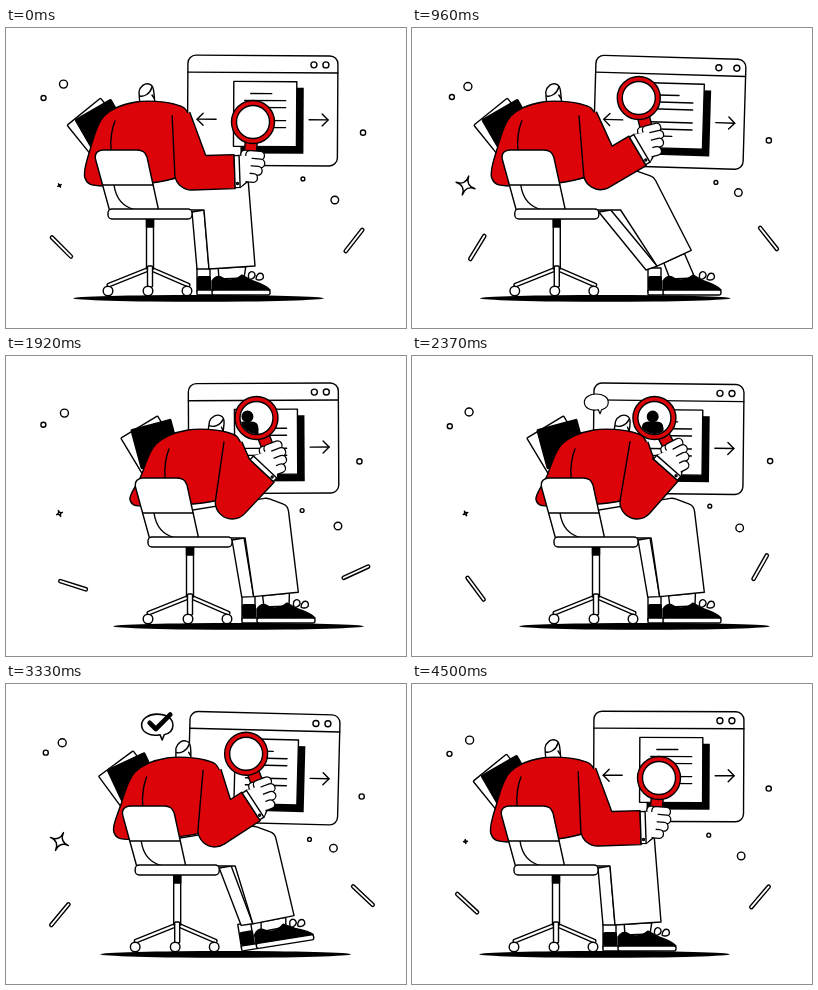
Write an HTML page with a canvas that moves like this. It is 400x300 px and loops after 4.53 s.

```html
<!DOCTYPE html>
<html lang="en">
<head>
<meta charset="utf-8">
<title>Searching</title>
<style>
html, body { margin: 0; width: 100%; height: 100%; overflow: hidden; background: #fff; }
canvas { display: block; width: 400px; height: 300px; }
</style>
</head>
<body>
<canvas id="stage"></canvas>
<script>
const LOOP = 4530, RED = '#dd0409', INK = '#000', PAPER = '#fff';
const canvas = document.getElementById('stage');
const c = canvas.getContext('2d');
const dpr = window.devicePixelRatio || 1;
canvas.width = 400 * dpr;
canvas.height = 300 * dpr;

// Lens path: time, x, y (measured from the chair), handle angle
const LENS = [
  [0, 247, 94, 95], [960, 226, 70, 76], [1500, 246, 97, 99], [1920, 210.5, 62, 69],
  [2850, 199, 62, 60], [3690, 228, 79, 80], [4350, 247, 94, 95], [LOOP, 247, 94, 95]
];
const TORSO = [[98,158], [79,150], [84,122], [98,88], [130,74], [168,76], [183,88], [188,130], [166,151]];
const SHOULDER = [175, 86];
const SPINE_PIVOT = [185, 172], SEAT_PIVOT = [150, 182];
const UPPER_ARM = 60, FOREARM = 43, ARM_R = 17;

// x, y, dot radius, orbit radius, start angle, direction
const DOTS = [
  [57, 57.5, 4, 1.5, -70, -1], [38.6, 69.2, 2.5, 1.3, 145, -1],
  [356, 108.5, 2.6, 4, -75, 1], [328.5, 168, 3.8, 4, 85, 1], [300, 153.5, 1.9, 4, -140, 1]
];

const rad = d => d * Math.PI / 180;
const mix = (a, b, u) => a + (b - a) * u;
const mixPt = (a, b, u) => [mix(a[0], b[0], u), mix(a[1], b[1], u)];
const polar = ([x, y], r, a) => [x + r * Math.cos(a), y + r * Math.sin(a)];
const clamp = v => Math.min(1, Math.max(0, v));

function ramp(t, from, to) {
  const p = clamp((t - from) / (to - from));
  return p < .5 ? 4 * p ** 3 : 1 - 4 * (1 - p) ** 3;
}
const pulse = (t, a, b, d, e) => ramp(t, a, b) * (1 - ramp(t, d, e));

function spin([x, y], [px, py], deg) {
  const a = rad(deg), dx = x - px, dy = y - py;
  return [px + dx * Math.cos(a) - dy * Math.sin(a), py + dx * Math.sin(a) + dy * Math.cos(a)];
}

// Smooth interpolation without overshoot.
function track(rows, t) {
  let i = 0;
  while (i < rows.length - 2 && t >= rows[i + 1][0]) i++;
  const h = rows[i + 1][0] - rows[i][0], p = (t - rows[i][0]) / h;
  return rows[i].map((v, k) => {
    const slope = j => (rows[j + 1][k] - rows[j][k]) / (rows[j + 1][0] - rows[j][0]);
    const tangent = j => {
      if (j === 0 || j === rows.length - 1) return 0;
      const a = slope(j - 1), b = slope(j);
      return a * b <= 0 ? 0 : 2 * a * b / (a + b);
    };
    return mix(v, rows[i + 1][k], p * p * (3 - 2 * p)) +
      h * (tangent(i) * p * (1 - p) ** 2 - tangent(i + 1) * p * p * (1 - p));
  }).slice(1);
}

function paint(fill, width = 1.4) {
  if (fill) { c.fillStyle = fill; c.fill(); }
  if (width) { c.lineWidth = width; c.stroke(); }
}
function poly(pts, fill, width, closed = true) {
  c.beginPath();
  pts.forEach(p => c.lineTo(...p));
  if (closed) c.closePath();
  paint(fill, width);
}
const line = (pts, width) => poly(pts, null, width, false);
function tube(pts, width) {
  line(pts, width);
  c.strokeStyle = PAPER;
  line(pts, width - 2.6);
  c.strokeStyle = INK;
}
function disc(x, y, r, fill = PAPER, width) {
  c.beginPath();
  c.arc(x, y, r, 0, 7);
  paint(fill, width);
}
function box(x, y, w, h, r, fill = PAPER, width) {
  c.beginPath();
  c.roundRect(x, y, w, h, r);
  paint(fill, width);
}
function svg(d, fill, width = 1.4) {
  const p = new Path2D(d);
  if (fill) { c.fillStyle = fill; c.fill(p); }
  if (width) { c.lineWidth = width; c.stroke(p); }
}
function blob(pts, fill) {
  const n = pts.length, at = i => pts[(i + n) % n];
  c.beginPath();
  c.moveTo(...pts[0]);
  for (let i = 0; i < n; i++) {
    const [a, b, d, e] = [at(i - 1), at(i), at(i + 1), at(i + 2)];
    c.bezierCurveTo(b[0] + (d[0] - a[0]) / 6, b[1] + (d[1] - a[1]) / 6,
      d[0] - (e[0] - b[0]) / 6, d[1] - (e[1] - b[1]) / 6, d[0], d[1]);
  }
  paint(fill);
}
function group(x, y, angle, draw, scale = 1) {
  c.save();
  c.translate(x, y);
  c.rotate(rad(angle));
  c.scale(scale, scale);
  draw();
  c.restore();
}
const around = ([x, y], angle, draw) =>
  group(x, y, angle, () => { c.translate(-x, -y); draw(); });

function windowPlace(p, draw) {
  const [x, y] = polar([257.3, 83.3], 1, rad(-130 - 360 * p));
  group(x, y, .8 + 1.1 * Math.cos(2 * Math.PI * (p - .32)), draw);
}

function browser(t) {
  const spread = 3 * pulse(t, 500, 900, 1500, 1900);
  box(-75, -55, 150, 110, 8);
  line([[-75, -38], [75, -38]]);
  disc(51 - spread, -46, 3);
  disc(63 + spread, -46, 3);
  [-1, 1].forEach(s => {
    line([[s * 46.5, 9], [s * 65.5, 9]]);
    line([[s * 59.5, 3], [s * 65.5, 9], [s * 59.5, 15]]);
  });
  box(-22, -23, 63, 66, 0, INK, 0);
  box(-29, -29, 63, 65, 0);
  for (let i = 0; i < 6; i++) {
    const x = -12 - Math.min(i, 1) * 6, y = -17 + i * 7 + (i > 2 ? 6 : 0);
    line([[x, y], [x + (i % 5 ? 41 : 21), y]]);
  }
}

function scatter(t, p) {
  DOTS.forEach(([x, y, r, orbit, start, dir]) =>
    disc(...polar([x, y], orbit, rad(start + dir * 360 * p)), r));
  const turn = 360 * t / LOOP;
  const stick = () => box(-15, -1.6, 30, 3.2, 1.5);
  group(...polar([60, 225.5], 8, rad(turn - 125)), 45 + turn, stick);
  group(...polar([352.5, 212.5], 4.5, rad(180 + 360 * p)), 128 - turn, stick);

  const r = 2 + 8 * Math.sin(Math.PI * p ** .8) ** 2;
  group(53.5, 157.5, (p - .26) * 115, () => {
    c.beginPath();
    c.moveTo(r, 0);
    for (let i = 1; i < 5; i++) c.quadraticCurveTo(0, 0, ...polar([0, 0], r, rad(90 * i)));
    paint(PAPER);
  });
}

function bubble(t, x, y) {
  const size = pulse(t, 2200, 2480, 3520, 3900);
  if (size < .01) return;
  group(x - 21, y - 21, 0, () => {
    svg('M0 1L-2-4C-11-2-19-6-19-13C-19-19-12-23-5-23C4-23 10-19 10-13C10-8 6-5 2-4Z', PAPER);
    const mark = pulse(t, 2430, 2680, 3250, 3600);
    if (mark > .01) group(-3, -14, 0, () => line([[-9, -1], [-3, 5], [11, -9]], 4.6), mark);
  }, size * 1.08);
}

function head(x, y, angle) {
  group(x, y, angle, () => {
    svg('M-7 4L-8-11C-7-17-2-20 2-19C7-18 7-12 8 4Z', PAPER);
    svg('M-7-7C-3-6 3-9 5-16M5-8L7-5');
  });
}

function files(lean, rock) {
  const x = 91 + 13 * lean - 9 * rock, y = 100 - 11 * lean + 8 * rock;
  const angle = -39 + 8 * lean + 54 * rock;
  group(x, y, angle, () => box(-21.5, -21, 43, 42, 1));
  group(x + 6, y - 1, angle + 9 + 7 * lean - 9 * rock, () => box(-20.5, -20, 41, 40, 1, INK));
}

function farShoe() {
  box(0, -27, 13, 24, 0);
  box(0, -19, 14, 14, 2, INK, 0);
  box(0, -5, 16, 5, 1);
}
function nearShoe() {
  svg('M15-5L15-14Q19-20 24-18Q34-11 45-20L56-14Q70-9 73-5Z', INK);
  box(15, -5, 58, 5, 2);
  [[52, 15], [59, 40]].forEach(([x, a]) =>
    group(x, -16, a, () => svg('M0 0C-5-7 3-11 5-5C5-2 2 0 0 0Z', PAPER)));
}

function legs(t, hip, foot) {
  const u = (foot - hip) / 45;
  const heel = [191 + foot, 267];
  const tilt = -22 * pulse(t, 3050, 3650, 3750, 4200) - 9 * Math.sin(Math.PI * ramp(t, 220, 820));
  const hemFront = [249 + 30 * u, 238 - 16 * u], hemBack = [203 + 42 * u, 241 - 3 * u];
  const shift = ([x, y]) => [x + hip, y];

  group(...heel, tilt, farShoe);
  poly([[186, 184], [198, 182], hemBack, [191 + 43 * u, 241 + u]].map(shift), PAPER);
  const sock = [[47, -17], [22, -16]].map(([x, y]) => spin([heel[0] + x, heel[1] + y], heel, tilt));
  poly([...[.2, .8].map(k => shift(mixPt(hemBack, hemFront, k))), ...sock], PAPER);
  group(...heel, tilt, nearShoe);

  group(hip, 0, 0, () => {
    const knee = [242 - u, 150 - u];
    c.beginPath();
    c.moveTo(110, 160);
    c.arcTo(221, 142, ...knee, 10);
    c.arcTo(...knee, ...hemFront, 9);
    [hemFront, hemBack, [198 + 10 * u, 182], [110, 182]].forEach(q => c.lineTo(...q));
    c.closePath();
    paint(PAPER);
  });
}

function chair(tilt) {
  around(SEAT_PIVOT, tilt, () => {
    svg('M104 184L90 133Q87 123 97 122L131 122Q139 122 141 129L153 184Z', PAPER);
    svg('M97 157L147 157M108 157Q111 178 130 182');
  });
  tube([[143, 241], [103, 257]], 5);
  tube([[145, 241], [182, 257]], 5);
  box(140.5, 191, 7, 50, 0);
  box(140.5, 191, 7, 8, 0, INK);
  box(141.5, 238, 5, 21, 1);
  [102, 142, 181].forEach(x => disc(x, 263, 4.8));
  box(102, 181, 84, 10, 4);
}

function torso(lean) {
  const pts = TORSO.map(([x, y]) => {
    const k = clamp((165 - y) / 50);
    return [x + lean * (2 + 10 * k), y - lean * 9 * (1 - k)];
  });
  blob(pts, RED);
  const x = 109 + 14 * lean;
  c.beginPath();
  c.moveTo(x, 93);
  c.quadraticCurveTo(x - 5, 105, x - 4, 122);
  paint();
}

// Two-bone arm; returns the direction of the forearm.
function arm(from, wrist) {
  const dx = wrist[0] - from[0], dy = wrist[1] - from[1];
  const d = Math.hypot(dx, dy), reach = Math.min(d, UPPER_ARM + FOREARM - 1);
  const bend = Math.acos((UPPER_ARM ** 2 + reach ** 2 - FOREARM ** 2) / (2 * UPPER_ARM * reach));
  const a1 = Math.atan2(dy, dx) + bend;
  const elbow = polar(from, UPPER_ARM, a1);
  const a2 = Math.atan2(wrist[1] - elbow[1], wrist[0] - elbow[0]);
  const q = Math.PI / 2;
  const fold = Math.min(46, ARM_R / Math.cos((a1 - a2) / 2));
  c.beginPath();
  c.moveTo(...polar(from, 9, a1 + q));
  c.arc(...elbow, ARM_R, a1 + q, a2 + q, true);
  c.lineTo(...polar(wrist, ARM_R, a2 + q));
  c.lineTo(...polar(wrist, ARM_R, a2 - q));
  c.lineTo(...polar(elbow, fold, (a1 + a2) / 2 - q));
  c.lineTo(...polar(from, 9, a1 - q));
  paint(RED);
  return a2;
}

function lens(x, y, angle, t, p) {
  group(x, y, angle, () => box(20, -6, 16, 12, 1, RED));
  disc(x, y, 21.5, RED);
  disc(x, y, 16.5);
  const size = pulse(t, 1500, 1800, 3000, 3250);
  if (size < .01) return;
  c.save();
  c.beginPath();
  c.arc(x, y, 16, 0, 7);
  c.clip();
  windowPlace(p, () => group(-16, -15, 0, () => {
    disc(0, -7, 6, INK, 0);
    svg('M-11 11V5Q-11-2-4-2H4Q11-2 11 5V11Z', INK, 0);
  }, size));
  c.restore();
}

function hand(at, wrist, a) {
  const q = Math.PI / 2;
  const edge = (side, out) => polar(polar(wrist, 16 * side, a + q), out, a);
  const top = edge(-1, 5), low = edge(1, 5);
  const thumb = [at(46, -6), at(33, -5)];
  tube(thumb, 10);
  poly([top, at(36, -6), at(34, 3), at(57, 3), low], PAPER);
  [10, 11, 9, 5].forEach((reach, i) => tube([at(33 + i * 7.6, 0), at(33 + i * 7.6, reach)], 10));
  poly([top, at(35, -6), at(33, 2), at(55, 1), low], PAPER, 0);
  poly([edge(-1, 0), top, low, edge(1, 0)], PAPER);
  disc(...polar(edge(.75, 0), 2.5, a), 1);
}

function draw(t) {
  const p = t / (LOOP / 2) % 1;
  const hip = 40 * (ramp(t, 800, 1750) - ramp(t, 2900, 3900));
  const foot = 45 * (ramp(t, 220, 820) - ramp(t, 3750, 4320));
  const lean = pulse(t, 1480, 1940, 2870, 3680);
  const rock = pulse(t, 950, 1480, 1500, 1920);

  const [lx, ly, la] = track(LENS, t);
  const a = rad(la);
  // Point along and beside the handle
  const at = (along, side) => polar(polar([lx + hip, ly], along, a), side, a - Math.PI / 2);
  const wrist = at(51, -14);
  const shoulder = spin([SHOULDER[0] + 12 * lean, SHOULDER[1]], SPINE_PIVOT, -7 * rock);
  const neck = spin([141 + 28 * lean - 14 * rock, 75 + 3 * lean], SPINE_PIVOT, -7 * rock);

  c.setTransform(dpr, 0, 0, dpr, 0, 0);
  c.fillStyle = PAPER;
  c.fillRect(0, 0, 400, 300);
  c.strokeStyle = INK;
  c.lineCap = c.lineJoin = 'round';

  windowPlace(p, () => browser(t));
  scatter(t, p);

  c.beginPath();
  c.ellipse(192.5 + hip, 270.3, 125.5, 3.4, 0, 0, 7);
  paint(INK, 0);

  group(hip, 0, 0, () => {
    bubble(t, ...neck);
    around(SPINE_PIVOT, -7 * rock, () => files(lean, rock));
    head(...neck, 12 * lean - 20 * rock);
  });
  legs(t, hip, foot);
  group(hip, 0, 0, () => {
    around(SPINE_PIVOT, -7 * rock, () => torso(lean));
    chair(-7 * rock);
  });
  const aim = arm([shoulder[0] + hip, shoulder[1]], wrist);
  lens(lx + hip, ly, la, t, p);
  hand(at, wrist, aim);
}

function frame(now) {
  draw(now % LOOP);
  requestAnimationFrame(frame);
}
requestAnimationFrame(frame);
</script>
</body>
</html>
```
